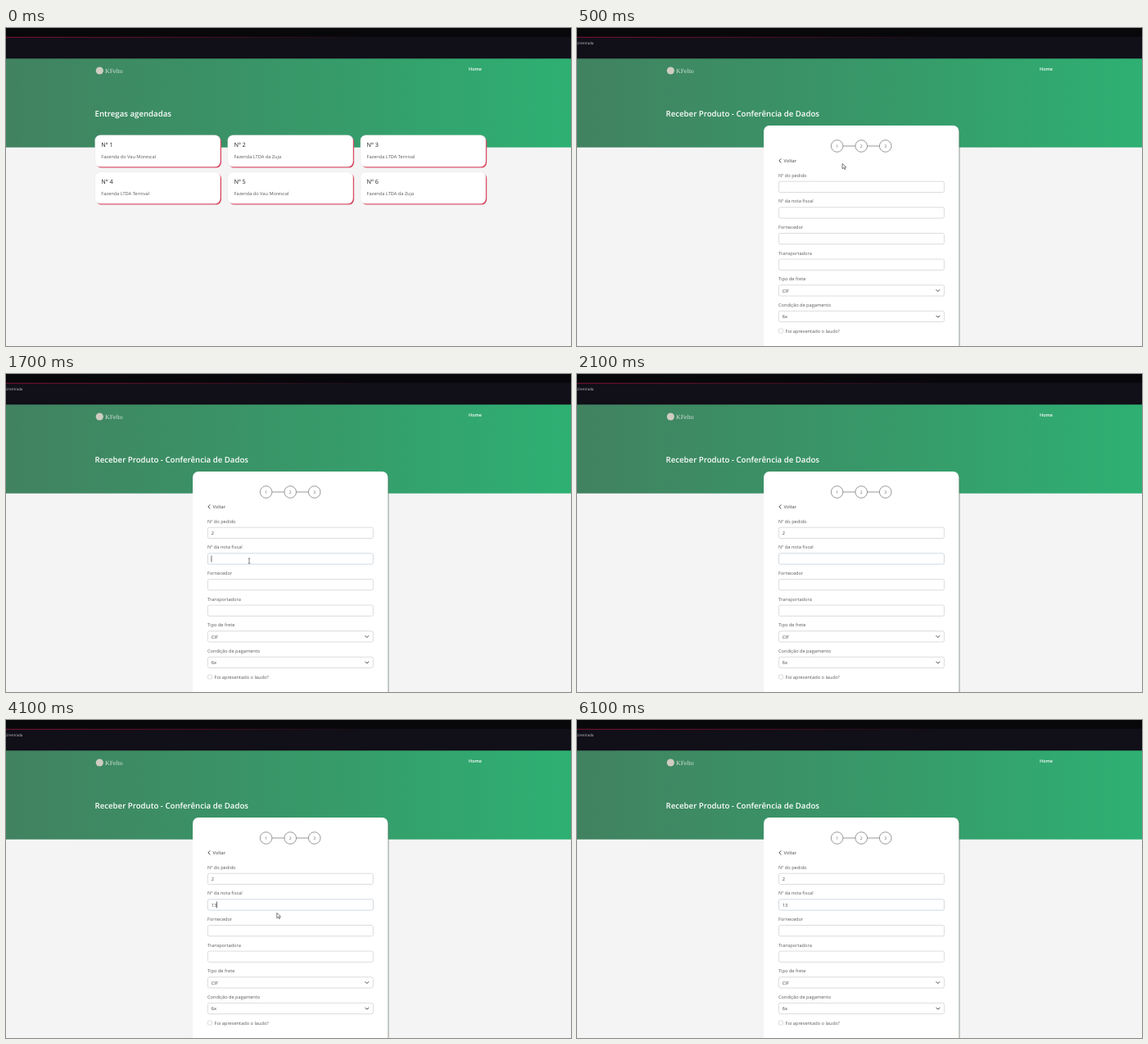
These frames come from a looping animation (690 px wide and 388 px high, 8 s). An HTML page:

```html
<!DOCTYPE html>
<html lang="pt-BR">
<head>
<meta charset="utf-8">
<title>Entregas</title>
<style>
  html, body { margin: 0; width: 100%; height: 100%; overflow: hidden; background: #f4f4f4; }
  svg { display: block; width: 100%; height: 100%; }
  text { font: 5.65px "Open Sans", "Noto Sans", sans-serif; fill: #5c5c5c; text-rendering: geometricPrecision; }
  .title { font-size: 9.65px; font-weight: 600; fill: #fff; }
  .nav { font-size: 5.5px; font-weight: 600; fill: #fff; }
  .brand { font: 7.8px "Liberation Serif", serif; fill: #d5e2d9; }
  .url { font-size: 4.45px; fill: #c9c8cc; }
  .num { font-size: 7.3px; font-weight: 500; fill: #222; }
  .step { font-size: 5px; text-anchor: middle; fill: #666; }
  .value { fill: #444; }
  .field { fill: #fff; stroke: #d2d4d6; stroke-width: .8; }
  .line { fill: none; stroke: #777; stroke-width: .75; }
  .chevron { fill: none; stroke: #333; stroke-width: .9; stroke-linecap: round; stroke-linejoin: round; }
  .pointer { fill: #fff; stroke: #444; stroke-width: .7; stroke-linejoin: round; }
</style>
</head>
<body>
<svg viewBox="0 0 690 388" preserveAspectRatio="none">
  <defs>
    <linearGradient id="green">
      <stop offset="0" stop-color="#418260"/>
      <stop offset=".5" stop-color="#389768"/>
      <stop offset="1" stop-color="#2eb073"/>
    </linearGradient>
    <linearGradient id="glow">
      <stop offset="0" stop-color="#7d1238"/>
      <stop offset=".35" stop-color="#4d0f28"/>
      <stop offset=".65" stop-color="#110f18"/>
    </linearGradient>
    <filter id="soft" x="-10%" y="-10%" width="120%" height="120%"><feGaussianBlur stdDeviation=".7"/></filter>
  </defs>
  <rect width="690" height="388" fill="#f4f4f4"/>
  <rect width="690" height="38" fill="#110f18"/>
  <rect width="690" height="11" fill="#08070a"/>
  <rect y="10.8" width="690" height="1" fill="url(#glow)"/>
  <rect y="37.3" width="690" height="108.4" fill="url(#green)"/>
  <circle cx="114.3" cy="52" r="4.6" fill="#cfcdc1"/>
  <text class="brand" x="121" y="55.3">KFelto</text>
  <text class="nav" x="565" y="52.4">Home</text>

  <g id="list"><text class="title" x="108.6" y="108">Entregas agendadas</text></g>

  <g id="form">
    <text class="url" x="0" y="20.3">2/entrada</text>
    <text class="title" x="108.6" y="108">Receber Produto - Conferência de Dados</text>
    <rect x="229" y="120" width="238.6" height="290" rx="7" fill="#5c6d64" opacity=".55" filter="url(#soft)"/>
    <rect x="228" y="119" width="238.4" height="290" rx="7" fill="#fff"/>
    <path class="line" d="M325 144H340M354.4 144H369.4"/>
    <path class="chevron" d="M249 159.7L246.9 161.9L249 164.1"/>
    <text class="value" x="252.5" y="164">Voltar</text>
    <rect class="field" x="246.5" y="367" width="5" height="5" rx="1"/>
    <text x="254.6" y="371.6">Foi apresentado o laudo?</text>
  </g>

  <rect id="caret" width=".7" height="8" fill="#333"/>
  <g id="pointers">
    <path class="pointer" data-kind="arrow" d="M0 0V6.3L1.6 4.9L2.7 7.2L3.8 6.7L2.8 4.5H4.7Z"/>
    <path class="pointer" data-kind="hand" d="M-1 -3.7Q-.2 -4.4 .4 -3.6V-1.2L2.4 -.7Q3.3 -.4 3.2 .6L2.5 3.6H-.8L-2.8 .9Q-2.7 -.1 -1.8 .3L-1 .9Z"/>
    <path data-kind="beam" fill="none" stroke="#555" stroke-width=".7" d="M-1.3 -3H1.3M0 -3V3M-1.3 3H1.3"/>
  </g>
</svg>
<script>
const LOOP = 8000, TICK = 100;
const $ = id => document.getElementById(id);

function add(parent, tag, attrs, text = "") {
  const el = document.createElementNS("http://www.w3.org/2000/svg", tag);
  for (const key in attrs) el.setAttribute(key, attrs[key]);
  el.textContent = text;
  return parent.appendChild(el);
}

// Delivery cards
const farms = ["Fazenda do Vau Morescal", "Fazenda LTDA da Zuja", "Fazenda LTDA Ternival"];
const cards = [0, 1, 2, 2, 0, 1].map((farm, i) => {
  const x = 108.7 + (i % 3) * 162.1, y = 130.7 + Math.floor(i / 3) * 45;
  const g = add($("list"), "g", {});
  const box = { width: 153, height: 38.6, rx: 6.5 };
  add(g, "rect", { ...box, x: x + 1.3, y: y + 1.3, fill: "#d9405c", filter: "url(#soft)" });
  add(g, "rect", { ...box, x, y, fill: "#fff", stroke: "#d8d8d8", "stroke-width": .3 });
  add(g, "text", { class: "num", x: x + 7.6, y: y + 14.6 }, "Nº " + (i + 1));
  add(g, "text", { x: x + 7.6, y: y + 28.7 }, farms[farm]);
  return { g, cx: x + 76.5, cy: y + 19.3 };
});

// Form fields
[317.6, 347.2, 376.7].forEach((cx, i) => {
  add($("form"), "circle", { class: "line", cx, cy: 144, r: 7.3 });
  add($("form"), "text", { class: "step", x: cx, y: 145.9 }, i + 1);
});
const labels = ["Nº do pedido", "Nº da nota fiscal", "Fornecedor", "Transportadora", "Tipo de frete", "Condição de pagamento"];
const preset = ["", "", "", "", "CIF", "6x"];
const fields = labels.map((label, i) => {
  const y = 187.2 + i * 31.62;
  add($("form"), "text", { x: 246, y: y - 5.4 }, label);
  const box = add($("form"), "rect", { class: "field", x: 246.4, y, width: 202, height: 13.3, rx: 2 });
  const value = add($("form"), "text", { class: "value", x: 250.8, y: y + 8.9 }, preset[i]);
  if (preset[i]) add($("form"), "path", { class: "chevron", d: `M438.8 ${y + 5.8}l2 2l2 -2` });
  return { y, box, value };
});

// [from ms, pointer, x, y]
const moves = [
  [0, ""],
  [300, "hand", 325, 184], [400, "hand", 325, 170],
  [500, "arrow", 324, 165.4],
  [1200, "arrow", 315, 176], [1300, "beam", 303, 193], [1400, "beam", 299, 195],
  [1600, "beam", 298, 212], [1700, "beam", 297, 228],
  [2000, ""],
  [3800, "beam", 299, 227], [3900, "beam", 308, 227], [4000, "beam", 322, 229],
  [4100, "arrow", 330.8, 235.4], [4200, "arrow", 336, 246], [4300, "arrow", 339.5, 256],
  [4400, "arrow", 341.5, 264],
  [4600, ""]
];
// [from ms, first value, second value, focused field or -1]
const typing = [
  [0, "", "", -1],
  [1400, "", "", 0], [1500, "2", "", 0], [1700, "2", "", 1], [2000, "2", "", -1],
  [3800, "2", "", 1], [3900, "2", "1", 1], [4000, "2", "13", 1], [4600, "2", "13", -1]
];
// [from ms, raised card or -1]
const hovers = [[0, -1], [300, 4], [400, 1], [500, -1]];

const at = (table, t) => table.findLast(row => row[0] <= t);
const show = (el, on) => { el.style.display = on ? "" : "none"; };

function draw(now) {
  const t = Math.floor((now % LOOP) / TICK) * TICK;
  const onForm = t >= 500;
  show($("list"), !onForm);
  show($("form"), onForm);

  const raised = at(hovers, t)[1];
  cards.forEach(({ g, cx, cy }, i) => g.setAttribute("transform",
    i === raised ? `translate(${cx} ${cy}) scale(1.01) translate(${-cx} ${-cy})` : ""));

  const [, first, second, focus] = at(typing, t);
  fields[0].value.textContent = first;
  fields[1].value.textContent = second;
  fields[1].box.style.stroke = t >= 1700 ? "#c3d0d9" : "";
  show($("caret"), focus >= 0);
  if (focus >= 0) {
    $("caret").setAttribute("x", 250.6 + [first, second][focus].length * 3.25);
    $("caret").setAttribute("y", fields[focus].y + 2.6);
  }

  const [, kind, x, y] = at(moves, t);
  for (const el of $("pointers").children) {
    const on = el.dataset.kind === kind;
    show(el, on);
    if (on) el.setAttribute("transform", `translate(${x} ${y})`);
  }
}

function frame() {
  draw(performance.now());
  requestAnimationFrame(frame);
}
frame();
</script>
</body>
</html>
```
